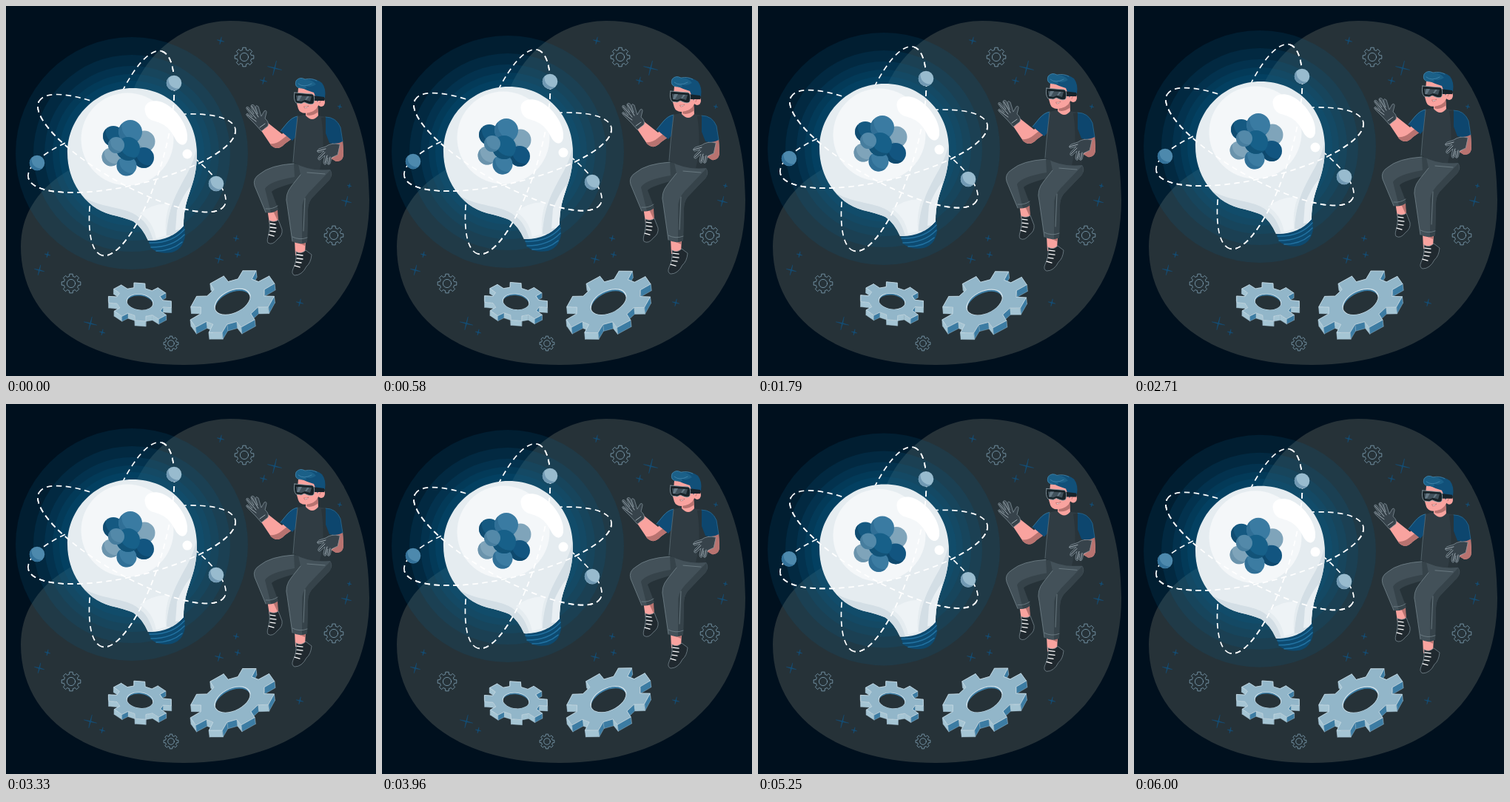
Animation, 500 px wide and 500 px high, one loop 6.04 s. Source, as an HTML page:

```html
<!DOCTYPE html>
<html>
<head>
<meta charset="utf-8">
<style>
html, body { margin: 0; width: 100%; height: 100%; overflow: hidden; background: #00101e; }
svg { display: block; width: 100vw; height: 100vh; }
path, ellipse, circle { stroke-linecap: round; stroke-linejoin: round; }
.line { fill: none; stroke: #8fb3c9; stroke-width: .7; }
.orbit { fill: none; stroke: #fff; stroke-width: 1.7; stroke-dasharray: 7.5 5.5; stroke-linecap: butt; }
.skin { fill: #f9a39f; }
.skinDark { fill: #b87370; }
.glove { fill: #37434b; stroke: #8a9aa3; stroke-width: .7; }
.finger { fill: none; stroke: #b9c6cd; stroke-width: .8; }
.shoe { fill: #20292f; stroke: #82919a; stroke-width: .7; }
.lace { fill: none; stroke: #fff; stroke-width: 1.3; }
</style>
</head>
<body>
<svg viewBox="0 0 500 500">
  <defs>
    <clipPath id="glass"><path id="glassShape" d="M171 111C222 111 258 150 258 199C258 246 240 254 240 297Q222 318 192 317Q184 299 172 291Q160 286 142 282C105 272 83 235 83 199C83 150 122 111 171 111Z"/></clipPath>
  </defs>
  <path fill="#263238" d="M20 325C20 285 40 250 80 225C130 195 160 160 170 120C186 68 238 20 303 20C426 20 491 127 491 262C491 402 392 485 240 485C110 485 20 425 20 325Z"/>
  <g id="decor"></g>
  <g id="gears"></g>

  <g class="float">
    <g id="glow"></g>
    <g id="back"></g>
    <path fill="#0d4a70" d="M192 315Q222 316 241 295L242 311Q239 329 224 333Q206 336 196 327Z"/>
    <path fill="none" stroke="#2171a0" stroke-width="1.5" d="M194 320Q224 321 241 302M196 326Q225 326 241 309M203 331Q224 331 238 319"/>
    <use href="#glassShape" fill="#e5ecf0"/>
    <g clip-path="url(#glass)">
      <path fill="#d3dee5" d="M258 190C250 235 221 246 217 310L250 310L270 190ZM83 235C105 278 160 266 180 286Q193 294 200 320L180 325L150 295L90 275Z"/>
      <path fill="#f2f6f8" d="M181 280Q202 265 221 268Q214 286 216 310L203 314Q198 290 181 280Z" opacity=".75"/>
      <path fill="#e9eff3" d="M231 276Q239 256 249 244L246 300L229 303Z"/>
    </g>
    <circle cx="164" cy="180" r="62.5" fill="#f4f7f9"/>
    <path fill="#fff" d="M188 143C185 131 197 125 211 130C231 138 247 163 245 180C243 191 234 189 229 180C218 158 207 158 196 154Q189 150 188 143Z"/>
    <circle cx="245" cy="200" r="6.5" fill="#fff"/>
    <g id="nucleus"></g>
    <g id="front"></g>
    <g id="moons"></g>
  </g>

  <g class="float">
    <!-- legs -->
    <path class="skin" d="M353 274L366 272L368 293L356 294ZM390 316L405 315L404 336L391 337Z"/>
    <path class="skinDark" d="M361 277L367 275L368 292ZM390 318L405 317L404 324Z"/>
    <path class="shoe" d="M356 290Q363 293 368 289L373 302Q374 310 367 315Q360 324 354 320Q352 317 355 309Q357 301 356 290Z"/>
    <path class="shoe" d="M392 332Q399 336 405 330L413 336Q412 347 406 352Q400 364 390 364Q385 362 388 355Q393 346 392 332Z"/>
    <path class="lace" d="M357 294L364 295M357 299L365 300M357 304L364 305M355 309L362 311M393 336L401 337M393 341L401 342M392 346L399 347M390 351L397 353"/>
    <path fill="#36434a" d="M389 213Q357 215 343 227Q333 233 336 243L351 279Q360 281 368 275L359 251Q362 246 400 236L410 215Z"/>
    <path fill="#435159" d="M389 213Q357 215 343 227Q333 233 336 243L351 279L358 279L350 247Q355 237 390 231Z"/>
    <path fill="#435159" d="M395 214L438 221Q444 229 434 238L413 260Q408 267 408 276L407 319Q397 324 387 318L380 269Q376 255 386 243L398 228Z"/>
    <path fill="#36434a" d="M438 222Q443 231 433 239L413 260Q408 267 408 276L407 319L400 321L400 270Q401 259 416 245Z"/>
    <path fill="none" stroke="#73838b" stroke-width=".8" d="M389 213Q357 215 343 227Q333 233 336 243L351 279M387 318L380 269Q376 255 386 243L398 228M351 274Q360 275 367 270M387 312Q397 317 407 313M407 225L431 227M404 260L402 304"/>
    <!-- near arm -->
    <path class="skin" d="M382 164L373 173L354 158L344 167L358 188Q367 197 377 186L391 176Z"/>
    <path class="skinDark" d="M358 188Q367 197 377 186L391 176L386 170L372 181Q365 187 357 186Z"/>
    <path fill="#0f4c77" d="M394 149Q387 150 380 158L371 169L387 182L394 174Z"/>
    <path fill="none" stroke="#3981aa" stroke-width=".8" d="M394 149Q387 150 380 158L371 169"/>
    <path class="glove" d="M345 169L337 160L326 149Q323 146 326 145L333 150L325 139Q324 135 328 137L335 146L331 136Q331 132 335 134L340 146L337 136Q338 133 341 136L345 149L349 142Q352 140 352 144L350 152Q356 157 354 162Z"/>
    <path class="finger" d="M326 147L338 156M326 138L338 152M332 135L341 150M343 164L350 159"/>
    <!-- torso -->
    <path fill="#303c43" d="M394 149L408 146L433 150Q438 158 437 181L438 221Q410 224 388 211L390 186Z"/>
    <path fill="#29343a" d="M433 150Q438 158 437 181L438 221L424 221Q432 190 426 151Z"/>
    <path fill="none" stroke="#63747d" stroke-width=".7" d="M394 150L390 186L388 211"/>
    <path class="skin" d="M405 138L421 133L422 148Q414 158 405 148Z"/>
    <path class="skinDark" d="M407 143Q416 145 421 134L422 143Q413 150 406 147Z"/>
    <!-- far arm -->
    <path class="skin" d="M441 184L455 182L456 199Q456 211 446 210L438 205Z"/>
    <path class="skinDark" d="M441 186L455 183L456 199Q456 211 446 210L439 206Q449 203 447 192Z"/>
    <path fill="#0d466e" d="M432 150Q446 150 452 164L455 183Q446 188 437 185L432 172Z"/>
    <path fill="none" stroke="#2c719c" stroke-width=".7" d="M432 150Q446 150 452 164L455 183"/>
    <path class="glove" d="M451 187Q440 184 432 190L423 193Q419 196 422 198L430 196L423 203Q420 208 424 208L431 202L429 210Q429 215 432 214L435 205L434 213Q436 216 438 213L440 205L448 201Z"/>
    <path class="finger" d="M423 206L431 198M431 212L434 202M436 213L438 204M421 196L432 193"/>
    <!-- head -->
    <path class="skin" d="M395 111L423 112L424 128Q422 141 410 144Q398 147 395 139L393 132Z"/>
    <ellipse cx="426" cy="130" rx="5" ry="6" class="skin"/>
    <path fill="none" stroke="#b87370" stroke-width=".9" d="M424 131Q425 126 429 128"/>
    <path fill="#115079" d="M398 110Q389 110 392 101Q397 95 404 99Q418 97 427 104Q433 112 431 124L427 124Q422 124 421 130L416 117Q406 114 398 110Z"/>
    <path fill="#1b6088" d="M398 111Q389 110 392 101Q397 95 404 99Q414 99 419 106Q412 111 405 108Q409 113 398 111Z"/>
    <path fill="none" stroke="#4b8eb5" stroke-width=".7" d="M398 111Q389 110 392 101Q397 95 404 99Q413 97 420 101M395 105Q402 111 413 105"/>
    <path fill="#17232b" d="M414 121L430 123L430 128L415 128Z"/>
    <path fill="#182329" stroke="#94a4ad" stroke-width=".8" d="M390 117L414 119Q418 121 416 131Q414 134 408 132L403 130L399 132L392 131Q388 126 390 117Z"/>
    <path fill="#41515b" d="M392 121L413 122L411 129L404 127L399 129L393 128Z"/>
    <path fill="#667985" d="M395 121L400 121L396 128L393 128ZM407 122L410 122L406 127L404 127Z"/>
    <path fill="#fff" stroke="#a85755" stroke-width=".6" d="M403 136Q406 137 409 135Q408 138 404 138Z"/>
  </g>
</svg>
<script>
const PERIOD = 6040, TAU = Math.PI * 2;
const $ = id => document.getElementById(id);
const add = (id, markup) => $(id).insertAdjacentHTML('beforeend', markup);
const toPath = pts => 'M' + pts.map(p => p.map(v => v.toFixed(2)).join(' ')).join('L') + 'Z';

// Eight-tooth outline mapped onto the plane spanned by u and v.
function gearPoints([cx, cy], u, v, root, tip) {
  const pts = [];
  for (let k = 0; k < 8; k++) {
    for (const [d, r] of [[-.24, root], [-.17, tip], [.17, tip], [.24, root]]) {
      const a = k * TAU / 8 + d, c = r * Math.cos(a), s = r * Math.sin(a);
      pts.push([cx + u[0] * c + v[0] * s, cy + u[1] * c + v[1] * s]);
    }
  }
  return pts;
}

function flatGear(x, y, r) {
  const d = toPath(gearPoints([x, y], [r, 0], [0, r], .77, 1));
  add('decor', `<path class="line" d="${d}"/><circle class="line" cx="${x}" cy="${y}" r="${r * .43}"/>`);
}

function star(x, y, r) {
  const d = `M0 ${-r}L.6 -.6L${r} 0L.6 .6L0 ${r}L-.6 .6L${-r} 0L-.6 -.6Z`;
  add('decor', `<path d="${d}" fill="#14507a" stroke="#14507a" stroke-width=".4" transform="translate(${x} ${y}) rotate(14)"/>`);
}

function solidGear(id, c, u, v, [dx, dy]) {
  const pts = gearPoints(c, u, v, .82, 1.1);
  const sides = pts.map((p, i) => [p, pts[(i + 1) % pts.length]])
    .sort((a, b) => a[0][1] + a[1][1] - b[0][1] - b[1][1])
    .map(([p, q]) => {
      const facesRight = q[1] - p[1] > .2 * Math.hypot(q[0] - p[0], q[1] - p[1]);
      const quad = [p, q, [q[0] + dx, q[1] + dy], [p[0] + dx, p[1] + dy]];
      return `<path d="${toPath(quad)}" fill="${facesRight ? '#3c7ca3' : '#a5c5d4'}" stroke="#a9c8d8" stroke-width=".4"/>`;
    }).join('');
  const hole = (ox, oy, attrs) =>
    `<circle r=".45" transform="matrix(${[...u, ...v, c[0] + ox, c[1] + oy]})" ${attrs}/>`;
  add('gears', `<clipPath id="${id}">${hole(0, 0, '')}</clipPath>${sides}
    <path d="${toPath(pts)}" fill="#92b6c9" stroke="#d0e1ea" stroke-width=".7"/>
    ${hole(0, 0, 'fill="#3c7ca3" stroke="#d0e1ea" stroke-width=".03"')}
    <g clip-path="url(#${id})">${hole(dx * .3, dy * .3, 'fill="#263238"')}</g>`);
}

function ball(id, x, y, r, fill, shade) {
  const edge = r * .707;
  add(id, `<circle cx="${x}" cy="${y}" r="${r}" fill="${fill}"/>
    <path fill="${shade}" d="M${x - edge} ${y - edge}A${r} ${r} 0 0 0 ${x + edge} ${y + edge}A${r * 1.2} ${r * 1.2} 0 0 1 ${x - edge} ${y - edge}Z"/>`);
}

[[322, 69, 13], [88, 375, 13], [443, 310, 13], [223, 456, 10]].forEach(g => flatGear(...g));
[[363, 84, 10], [290, 47, 5], [348, 101, 5], [451, 136, 3], [464, 243, 3], [460, 264, 7],
 [45, 357, 7], [56, 336, 4], [114, 429, 9], [130, 441, 4], [288, 342, 6], [313, 336, 4],
 [397, 401, 5], [311, 314, 4]].forEach(s => star(...s));

solidGear('smallHole', [181, 400], [39, 3], [.5, 23.5], [0, 7]);
solidGear('bigHole', [306, 399.5], [49.1, -27.2], [19.2, 27.2], [1, 9]);

for (const r of [157, 133, 118, 107, 98])
  add('glow', `<circle cx="170" cy="199" r="${r}" fill="#0a5a87" opacity=".19"/>`);

for (const angle of [-73.6, 29.3, -13.4]) {
  const arc = (id, x) => add(id, `<path class="orbit" transform="translate(170 199) rotate(${angle})" d="M${x} 0A143.7 42.5 0 0 1 ${-x} 0"/>`);
  arc('back', -143.7);
  arc('back', 143.7);
  arc('front', 143.7);
}

[[145, 176, 14, '#155981', '#104c71'], [187, 183, 14.5, '#7fa4ba', '#6f98b0'],
 [142, 204, 12.5, '#7fa4ba', '#6a93ac'], [186, 205, 14, '#125580', '#0e496e'],
 [163, 216, 13.5, '#3c7ca2', '#306f96'], [168, 170, 16, '#3a7ba2', '#306f96'],
 [165, 193, 16, '#176089', '#125378'], [149, 188, 11, '#5389a9', '#467d9e']]
  .forEach(b => ball('nucleus', ...b));

[[227, 104, '#98bbce', '#7199b3'], [42, 212, '#4d89ad', '#34729a'], [284, 240, '#98bbce', '#7199b3']]
  .forEach(([x, y, fill, shade]) => ball('moons', x, y, 10.3, fill, shade));

const floats = document.querySelectorAll('.float');
function draw() {
  const p = performance.now() % PERIOD / PERIOD;
  const lift = -10 * (1 - Math.abs(1 - 2 * p));
  // Triangle swing: 0, 1, 0, -1 degrees over one loop.
  const tilt = p < .25 ? 4 * p : p < .75 ? 2 - 4 * p : 4 * p - 4;
  floats.forEach(g => g.setAttribute('transform', `translate(0 ${lift})`));
  $('gears').setAttribute('transform', `rotate(${tilt} 251 404)`);
  requestAnimationFrame(draw);
}
draw();
</script>
</body>
</html>
```
